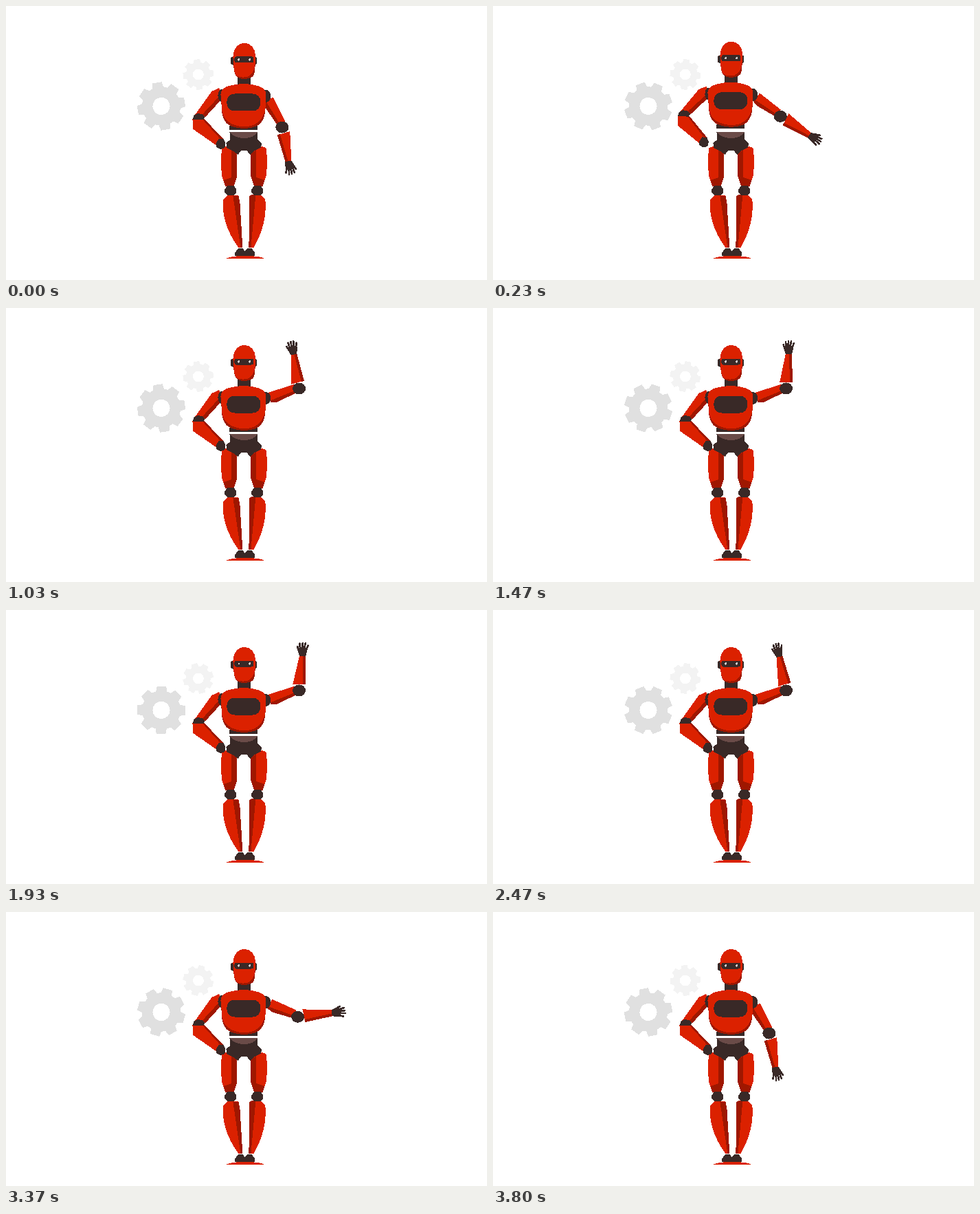
An HTML page that plays this animation: 700 by 398 pixels, repeating every 3830 ms.

```html
<!DOCTYPE html>
<html lang="en">
<head>
<meta charset="utf-8">
<title>Waving robot</title>
<style>
html, body { margin: 0; width: 100%; height: 100%; overflow: hidden; background: #fff; }
svg { display: block; width: 700px; height: 398px; shape-rendering: crispEdges; }
.red { fill: #db2100; }
.shade { fill: #9f1700; }
.dark { fill: #392927; }
.fingers { fill: none; stroke: #392927; stroke-width: 2.7; stroke-linecap: round; }
</style>
</head>
<body>
<svg viewBox="0 0 700 398">
  <defs>
    <g id="thigh">
      <path class="red" d="M315 206L324 203L330 207L337 215V248L332 262H320L315 248Q312 226 315 206Z"/>
      <path class="shade" d="M329 208L337 215V248L332 262H320L317 253L329 249Z"/>
      <path class="dark" d="M323 261H332L336 266V271L332 275H323L319 271V266Z"/>
    </g>
  </defs>

  <path id="bigGear" fill="#e0e0e0" fill-rule="evenodd"/>
  <path id="smallGear" fill="#f3f3f3" fill-rule="evenodd"/>

  <g transform="translate(-.6 0)">
    <path class="red" d="M321 367Q328 363 349 363Q370 363 377 367Z"/>
    <path class="red" d="M317 281L323 275H339L341 285L345 351H339Q313 315 317 281Z"/>
    <path class="shade" d="M331 276H339L341 285L345 351H342Z"/>
    <path class="red" d="M355 276L358 274H371L378 281Q381 317 361 351H354Z"/>
    <path class="shade" d="M355 276L358 274H364L357 351H354Z"/>
    <use href="#thigh"/>
    <use href="#thigh" transform="matrix(-1 0 0 1 694 0)"/>
    <path class="dark" d="M334 363V358L339 352H345L348 356L352 352H358L363 358V363Z"/>
    <path class="dark" d="M326 183H367V194L373 200L371 206L361 211L356 216L351 210H343L338 216L332 211L322 206L321 199L327 194Z"/>
    <path fill="#6a4b48" d="M326 183H367Q361 192 347 192Q333 192 326 183Z"/>

    <g id="body">
      <g id="leftArm">
        <path class="red" d="M300 124L311 119L313 136L291 161L275 159Z"/>
        <path class="shade" d="M312 130L313 137L291 161L285 159Z"/>
        <path class="red" d="M272 164H289L317 193L309 204L273 179Z"/>
        <path class="shade" d="M286 164H289L317 193L315 196Z"/>
        <path class="dark" d="M272 165L274 159L279 156L286 157L290 161L288 165Z"/>
        <path class="dark" d="M306 200L310 193L317 193L320 199L319 206L313 208L307 205Z"/>
      </g>
      <ellipse class="dark" cx="314" cy="130" rx="5" ry="9"/>
      <g id="upperArm">
        <path class="red" d="M5 -8H44L42 5L13 9L4 7Z"/>
        <path class="shade" d="M4 4L42 1V5L13 9L4 7Z"/>
      </g>
      <g id="foreArm">
        <path class="red" d="M8 -10L50 -4V5L10 9Z"/>
        <path class="shade" d="M9 5L50 1V5L10 9Z"/>
        <path class="dark" d="M50 -4L55 -6L61 -7L64 0L61 7L55 6L50 5Z"/>
        <path class="fingers" d="M56 -5L63 -8M61 -4L68 -5M62 -1L69 -1M62 2L69 3M60 5L66 7"/>
      </g>
      <ellipse id="elbow" class="dark" rx="9.5" ry="8.5"/>
      <ellipse class="dark" cx="379" cy="131" rx="7" ry="9"/>

      <path class="dark" d="M338 100H357V118H338ZM326 174H367V180H326Z"/>
      <path class="shade" d="M313 128Q314 119 325 116Q347 110 367 116Q379 119 379 129L378 152Q376 170 364 175Q347 181 330 175Q317 171 315 155Z"/>
      <path class="red" d="M313 128Q314 119 325 116Q347 110 367 116Q379 119 379 129L378 150Q374 167 361 173Q346 178 331 172Q317 166 315 152Z"/>
      <rect class="dark" x="322" y="127.5" width="49" height="25" rx="11.5"/>

      <path class="dark" d="M328 75L332 73V86L328 84ZM362 73L366 75V84L362 86Z"/>
      <path class="shade" d="M331 74C331 47 364 47 364 74L363 90Q363 98 360 102Q355 106 347 106Q339 106 335 101Q332 96 332 88Z"/>
      <path class="red" d="M331 74C331 47 364 47 364 74L363 86Q361 99 352 103Q340 105 335 100Q332 95 332 86Z"/>
      <rect class="dark" x="333" y="73.5" width="28" height="9" rx="3"/>
      <ellipse id="wink" cx="339.5" cy="78" rx="1.7" ry="1.7" fill="#d0cac9"/>
      <circle cx="355.5" cy="78" r="1.7" fill="#d0cac9"/>
    </g>
  </g>
</svg>
<script>
const LOOP = 3830;
const UPPER_LENGTH = 49.5;
const SHOULDER = [380, 132];
const RAD = Math.PI / 180;

// time, upper arm angle, forearm angle
const POSES = [
  [0, 63, 79], [470, -1, -43], [700, -14, -80], [1150, -17.7, -101],
  [1690, -17.7, -78], [2370, -17.7, -102], [2970, -17.7, -86],
  [3200, -3, -57], [3370, 24, -7], [3700, 63, 79], [LOOP, 63, 79]
];

const $ = id => document.getElementById(id);
const place = (id, transform) => $(id).setAttribute('transform', transform);

function gearPath(radius) {
  const points = [];
  for (let i = 0; i < 8; i++) {
    for (const [r, a] of [[.8, -.29], [1, -.19], [1, .19], [.8, .29]]) {
      const angle = i * Math.PI / 4 + a;
      points.push(radius * r * Math.cos(angle) + ' ' + radius * r * Math.sin(angle));
    }
  }
  const hole = radius * .355;
  return `M${points.join('L')}ZM${hole} 0A${hole} ${hole} 0 1 1 ${-hole} 0A${hole} ${hole} 0 1 1 ${hole} 0Z`;
}

// Slope through a pose; flat where the motion turns or rests.
function slope(i, k) {
  const [a, b, c] = [POSES[i - 1], POSES[i], POSES[i + 1]];
  if (!a || !c || (b[k] - a[k]) * (c[k] - b[k]) <= 0) return 0;
  return (c[k] - a[k]) / (c[0] - a[0]);
}

function poseAt(t, k) {
  const i = POSES.findIndex(p => p[0] > t) - 1;
  const a = POSES[i], b = POSES[i + 1], span = b[0] - a[0];
  const s = (t - a[0]) / span, s2 = s * s, s3 = s2 * s;
  return a[k] * (2 * s3 - 3 * s2 + 1) + b[k] * (3 * s2 - 2 * s3)
    + span * (slope(i, k) * (s3 - 2 * s2 + s) + slope(i + 1, k) * (s3 - s2));
}

const hump = (t, start, end) =>
  t > start && t < end ? Math.sin(Math.PI * (t - start) / (end - start)) ** 2 : 0;

function draw(t) {
  // The gears turn one way for half the loop, then back.
  const turn = 80 * (1 - Math.abs(1 - 2 * t / LOOP));
  place('bigGear', `translate(226 145.5) rotate(${-turn - 10})`);
  place('smallGear', `translate(279.8 99.5) rotate(${turn - 5})`);

  const lift = hump(t, 0, 1000);
  place('body', `translate(0 ${-5 * lift})`);
  place('leftArm', `rotate(${10 * lift} 313 128)`);

  const upper = poseAt(t, 1), fore = poseAt(t, 2);
  const x = SHOULDER[0] + UPPER_LENGTH * Math.cos(upper * RAD);
  const y = SHOULDER[1] + UPPER_LENGTH * Math.sin(upper * RAD);
  place('upperArm', `translate(${SHOULDER}) rotate(${upper})`);
  place('foreArm', `translate(${x} ${y}) rotate(${fore})`);
  place('elbow', `translate(${x} ${y})`);
  $('wink').setAttribute('ry', 1.7 - 1.1 * hump(t, 1800, 2060));
}

$('bigGear').setAttribute('d', gearPath(35.3));
$('smallGear').setAttribute('d', gearPath(22.5));

const start = performance.now();
function tick() {
  draw((performance.now() - start) % LOOP);
  requestAnimationFrame(tick);
}
tick();
</script>
</body>
</html>
```
